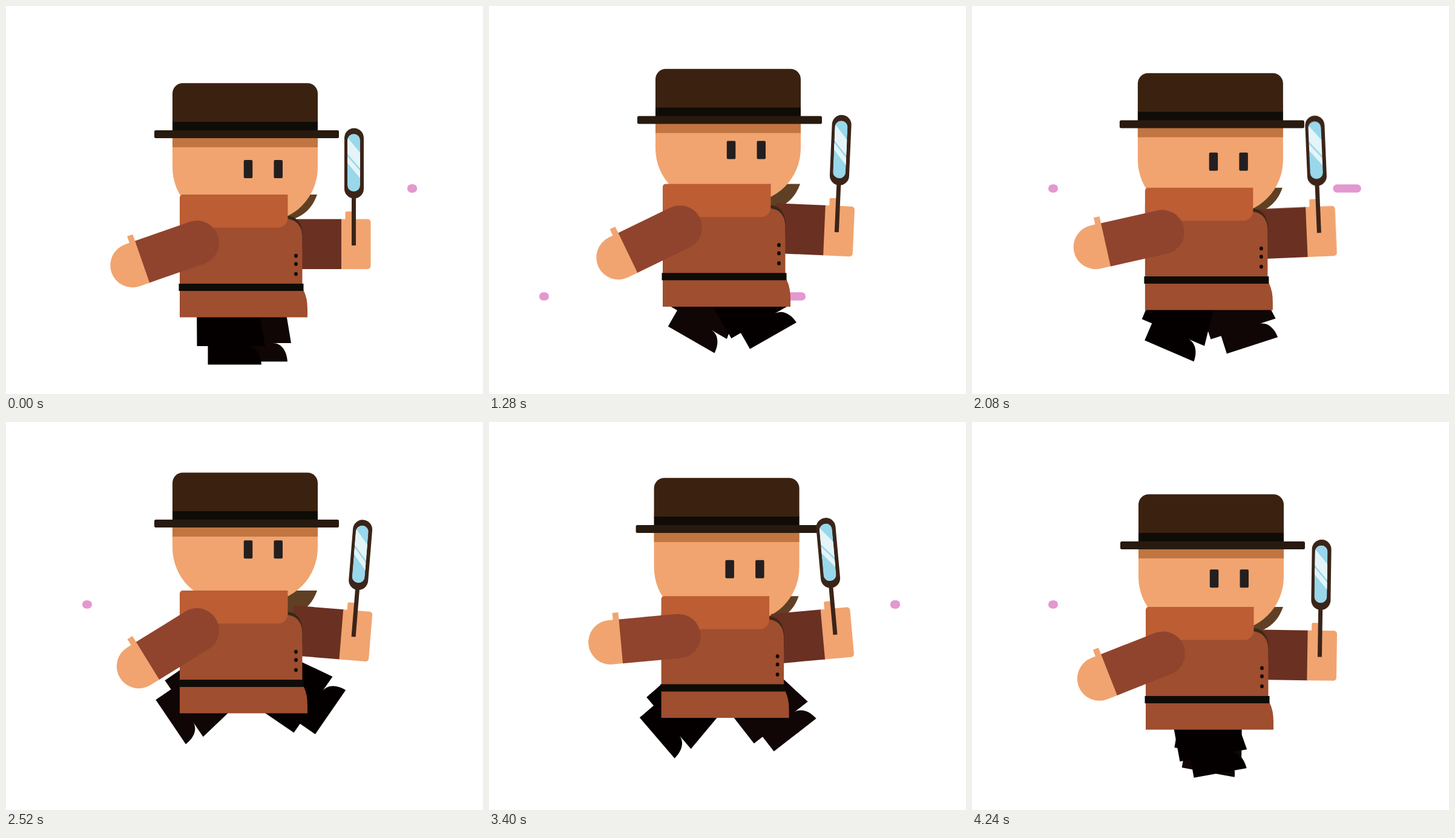
An HTML page without scripts that plays this animation: 788x640 px, repeating every 4.28 s.

```html
<!DOCTYPE html>
<html lang="en">
<head>
<meta charset="utf-8">
<title>Walking detective</title>
<style>
  /* stride: 1 = near leg back, 0 = legs together, -1 = near leg forward */
  @property --stride { syntax: "<number>"; inherits: true; initial-value: 0; }

  html, body { margin: 0; width: 100%; height: 100%; overflow: hidden; background: #fff; }
  svg {
    display: block; width: 788px; height: 640px;
    animation: walk 4280ms infinite;
  }
  /* sine quarters: ease out of rest, ease in from a full stride */
  @keyframes walk {
    0%, .23%, 17.01%, 33.88%, 50.65%, 67.52%, 84.3% {
      --stride: 0; animation-timing-function: cubic-bezier(.36, .57, .64, 1);
    }
    32.71%, 66.36%, 100% { --stride: 0; animation-timing-function: linear; }
    8.64%, 42.29%, 75.93% { --stride: 1; animation-timing-function: cubic-bezier(.36, 0, .64, .43); }
    24.88%, 58.53%, 92.17% { --stride: -1; animation-timing-function: cubic-bezier(.36, 0, .64, .43); }
  }

  /* each part blends from rest to pose a (xa, ya, ra) or pose b (xb, yb, rb) */
  .part {
    --a: max(0, var(--stride));
    --b: max(0, -1 * var(--stride));
    --xa: -3; --ya: 0; --ra: 0;
    --xb: 0; --yb: 0; --rb: 0;
    transform:
      translate(calc((var(--a) * var(--xa) + var(--b) * var(--xb)) * 1px),
                calc((var(--a) * var(--ya) + var(--b) * var(--yb)) * 1px))
      rotate(calc((var(--a) * var(--ra) + var(--b) * var(--rb)) * 1deg));
  }
  .hat { --ya: -44; --yb: -44; }
  .face { --ya: -33; --yb: -59; }
  .scarf { --ya: -30; --yb: -33; }
  .body { --ya: -32; --yb: -33; }
  .left-arm { --ya: -47; --yb: -47; --ra: 17.6; --rb: -12.5; transform-origin: 315.5px 390.5px; }
  .right-arm { --ya: -47; --yb: -47; --ra: -6.5; --rb: 4.7; transform-origin: 500px 393px; }
  .near { --ya: -33; --ra: 62; --xb: 53; --yb: -57; --rb: -55.5; transform-origin: 377px 463px; }
  .far { --xa: 8; --ya: -54; --ra: -47.5; --xb: -42; --yb: -36; --rb: 56; transform-origin: 420px 458px; }

  /* wind streaks */
  .streak {
    --l: 126px; --r: 663px; --exit: 65px;
    y: 294.3px; height: 13.4px; rx: 6.7px; fill: #e398cf;
  }
  .low { --l: 83px; --r: 639px; --exit: 83px; y: 472.3px; }
  .first { animation: first 4280ms linear infinite; }
  .second { animation: second 4280ms linear infinite; }
  .s2 { animation-delay: -2600ms; }
  .s3 { animation-delay: -920ms; }
  .low { animation-delay: -3490ms; }
  @keyframes first {
    0%, 4.2% { x: var(--r); width: 16px; }
    6.3% { x: 470px; width: 170px; }
    8.41% { x: 244px; width: 113px; }
    9% { x: var(--exit); width: 20px; }
    9.01% { x: var(--l); width: 16px; }
    21.48% { x: var(--l); width: 16px; opacity: 1; }
    21.49%, 100% { x: var(--l); width: 16px; opacity: 0; }
  }
  @keyframes second {
    0%, 8.2% { x: var(--r); width: 16px; }
    9.35% { x: 598px; width: 46px; }
    14.02% { x: 208px; width: 170px; }
    16.4% { x: var(--exit); width: 30px; }
    17.2% { x: var(--exit); width: 16px; opacity: 1; }
    17.21%, 100% { x: var(--exit); width: 16px; opacity: 0; }
  }
</style>
</head>
<body>
<svg viewBox="0 0 788 640">
  <defs>
    <path id="leg" d="M315 470H413L420 513L428 561H398C412 561 421 574 422 591.5H333.5V561H315.5Z"/>
    <clipPath id="lens"><rect x="564" y="211" width="21" height="95" rx="10.5"/></clipPath>
  </defs>

  <rect class="streak second"/>
  <rect class="streak second s2"/>
  <rect class="streak second s3"/>
  <rect class="streak second low"/>

  <path class="part scarf" fill="#5f4024" d="M440 311H514C506 334 489 350 465 353H440Z"/>

  <g class="part face">
    <path fill="#f1a470" d="M275 175H515V266A90 90 0 0 1 425 356H365A90 90 0 0 1 275 266Z"/>
    <g fill="#231f20">
      <rect x="392.8" y="254" width="14.5" height="30" rx="2"/>
      <rect x="442.5" y="254" width="14.5" height="30" rx="2"/>
    </g>
  </g>

  <g class="part hat">
    <rect x="275" y="217" width="240" height="16" fill="#c17541"/>
    <path fill="#3b2210" d="M275 192V144.3A17 17 0 0 1 292 127.3H498A17 17 0 0 1 515 144.3V192Z"/>
    <rect x="275" y="191" width="240" height="15" fill="#0f0c07"/>
    <rect x="245" y="205" width="305" height="13" rx="2.5" fill="#281a0e"/>
  </g>

  <g class="part right-arm">
    <rect x="472" y="351.5" width="83" height="82.5" fill="#6a3022"/>
    <path fill="#f1a470" d="M554 351.5H560.5V341A2 2 0 0 1 562.5 339H572V351.5H597.5A5 5 0 0 1 602.5 356.5V429A5 5 0 0 1 597.5 434H554Z"/>
    <g fill="#3b2418">
      <rect x="571" y="312" width="7" height="83"/>
      <rect x="559" y="201.5" width="32" height="116" rx="16"/>
    </g>
    <g clip-path="url(#lens)">
      <rect x="564" y="211" width="21" height="95" fill="#99d7ea"/>
      <path fill="#e4f4f9" d="M564 217L585 242V268L564 244ZM564 248L585 272V284L564 259Z"/>
    </g>
  </g>

  <g class="part far"><use href="#leg" x="43" y="-5" fill="#0f0605"/></g>
  <g class="part near"><use href="#leg" fill="#050000"/></g>

  <g class="part body">
    <path fill="#3b2717" d="M440 346H465C481 347 490 360 490 380V400H440Z"/>
    <path fill="#9f4e2f" d="M287 340H455V351H463C478 352 489 361 489.5 380V465L492 470Q498 482 498 500V513.5H287Z"/>
    <rect x="285.5" y="458" width="206" height="12" fill="#0f0c07"/>
    <g fill="#0f0c07">
      <ellipse cx="479" cy="412" rx="2.9" ry="3.3"/>
      <ellipse cx="479" cy="425.5" rx="2.9" ry="3.3"/>
      <ellipse cx="479" cy="442" rx="2.9" ry="3.3"/>
    </g>
  </g>

  <path class="part scarf" fill="#bc5d34" d="M287 316A5 5 0 0 1 292 311H465.5V349.5A16 16 0 0 1 449.5 365.5H287Z"/>

  <g class="part left-arm">
    <g transform="translate(315.5 390.5) rotate(-19.2)">
      <path fill="#f1a470" d="M-95 36.5H-113A36.5 36.5 0 0 1 -113 -36.5H-105.5V-48H-95.7V-36.5H-95Z"/>
      <path fill="#90442e" d="M-95.7 -36.5H0A36.5 36.5 0 0 1 0 36.5H-95.7Z"/>
    </g>
  </g>

  <rect class="streak first"/>
  <rect class="streak first s2"/>
  <rect class="streak first s3"/>
  <rect class="streak first low"/>
</svg>
</body>
</html>
```
